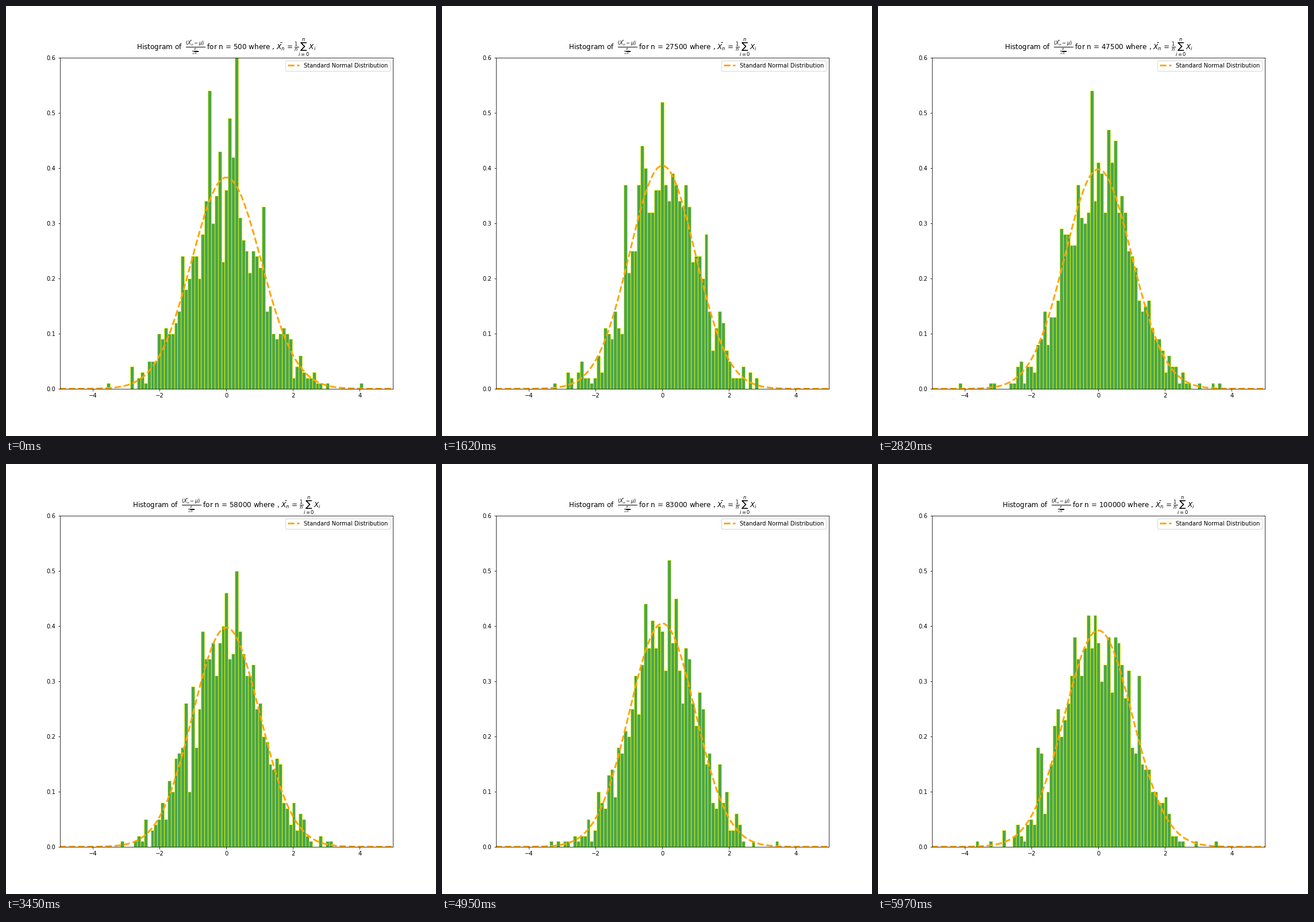
A matplotlib script for the animation above (6000 ms loop, 748x748 px).

```python
import numpy as np
import matplotlib.pyplot as plt
from matplotlib.animation import FuncAnimation

FRAMES, STEP, DRAWS = 200, 500, 1000
EDGES = np.linspace(-5, 5, 100)
BIAS = 0.12  # small error in the assumed mean, in coin flips

TITLE = (r"Histogram of  $\frac{(\bar{X_n} - \mu)}{\frac{\sigma}{\sqrt{n}}}$"
         r" for n = %d where , $\bar{X_n}$ = $\frac{1}{n}\sum_{i=0}^{n} X_i$")


def sample(n):
    """Bin heights and spread of standardised means of n coin flips."""
    flips = np.random.default_rng(n).binomial(n, 0.5, DRAWS)
    z = (flips - n / 2 - BIAS) / (0.5 * np.sqrt(n))
    return np.histogram(z, EDGES)[0] / 100, z.std()


def normal(x, sigma):
    return np.exp(-0.5 * (x / sigma) ** 2) / (sigma * np.sqrt(2 * np.pi))


fig, ax = plt.subplots(figsize=(10.389, 10.389), dpi=72)
bars = ax.bar(EDGES[:-1], np.zeros(len(EDGES) - 1), np.diff(EDGES), align="edge",
              facecolor="green", edgecolor="yellow", alpha=0.7)
curve, = ax.plot(EDGES, normal(EDGES, 1), "--", color="orange", lw=3,
                 label="Standard Normal Distribution")
ax.set(xlim=(-5, 5), ylim=(0, 0.6))
ax.legend(loc="upper right")
title = ax.set_title(TITLE % STEP)


def update(i):
    n = STEP * (i + 1)
    heights, sigma = sample(n)
    for bar, h in zip(bars, heights):
        bar.set_height(h)
    curve.set_ydata(normal(EDGES, sigma))
    title.set_text(TITLE % n)
    return [*bars, curve, title]


anim = FuncAnimation(fig, update, frames=FRAMES, interval=30, repeat=True,
                     repeat_delay=0, init_func=lambda: update(0))
plt.show()
```
